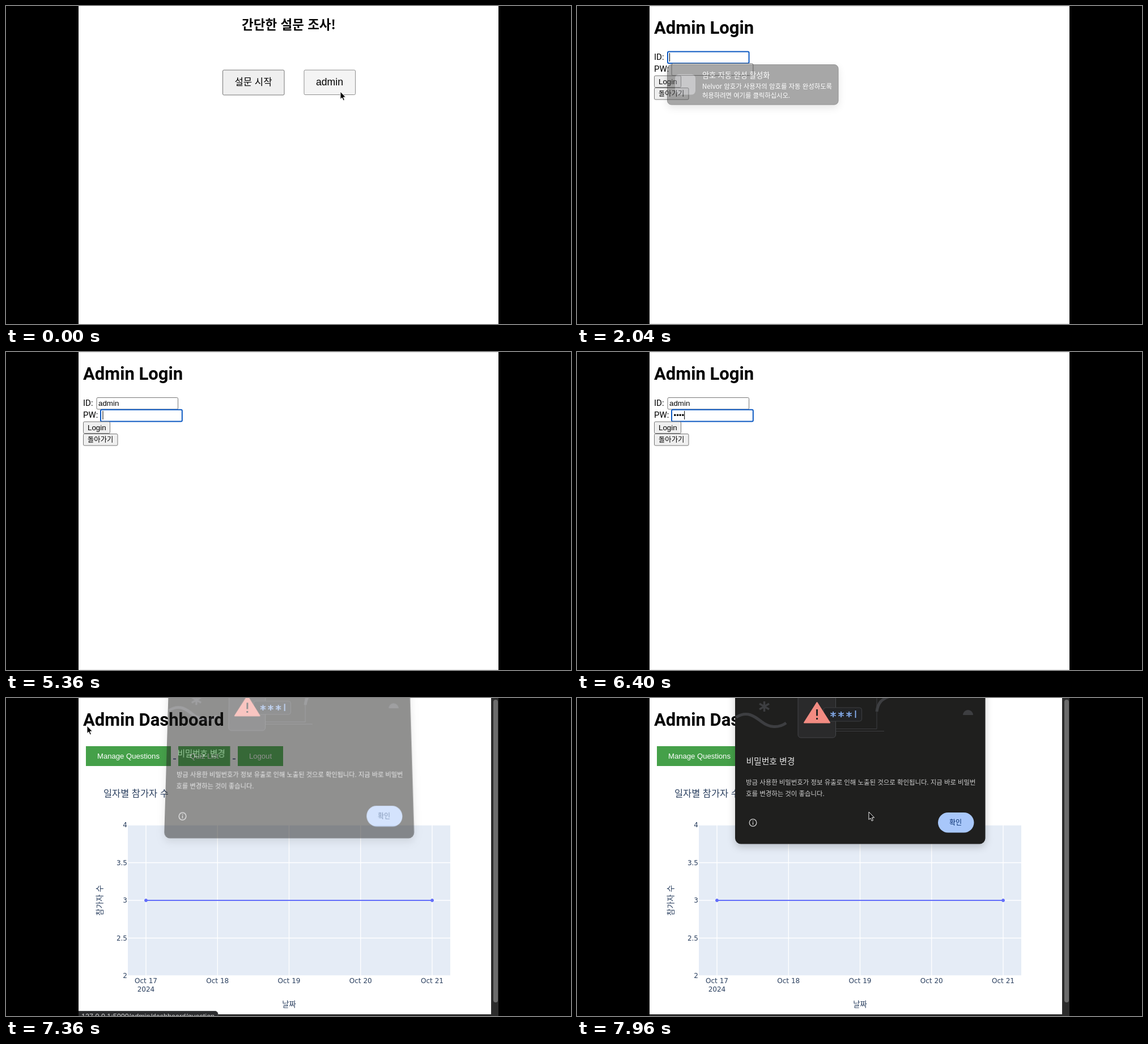
An HTML page for the animation above (8 s loop, 997x561 px).

```html
<!DOCTYPE html>
<html lang="ko">
<head>
<meta charset="utf-8">
<title>설문 조사</title>
<style>
  html, body { margin: 0; width: 100%; height: 100%; overflow: hidden; background: #000; }
  svg { position: absolute; left: 0; top: 0; width: 997px; height: 561px; }
  text { font: 13.33px "Liberation Sans", Arial, sans-serif; white-space: pre; }
  .ko { font-family: "Noto Sans CJK KR", "Noto Sans CJK", sans-serif; }
  .heading { font: bold 31px Roboto, sans-serif; }
  .label { font: 15px Roboto, sans-serif; }
  .chart text { fill: #2a3f5f; }
  .tick { font: 12px "DejaVu Sans", Verdana, sans-serif; }
  .mid { text-anchor: middle; }
  .end { text-anchor: end; }
  .button { fill: #efefef; stroke: #767676; }
  .field { fill: #fff; stroke: #767676; }
  .focus { stroke: #0c59c2; stroke-width: 2; }
  .green { fill: #4caf50; }
  .nav text { fill: #fff; font-size: 13.1px; text-anchor: middle; }
  .float { filter: drop-shadow(0 5px 7px rgba(0, 0, 0, .2)); }
  #dialog { overflow: visible; transform-origin: 499.5px 257px; }
</style>
</head>
<body>
<svg viewBox="0 0 997 561">
  <rect x="128" width="741" height="561" fill="#fff"/>

  <g id="home">
    <text class="ko mid" x="499" y="40.500" style="font-size:22.5px;font-weight:bold">간단한 설문 조사!</text>
    <rect class="button" x="382.500" y="113" width="108.500" height="44" rx="2"/>
    <text class="ko mid" x="436.500" y="140" style="font-size:16.7px">설문 시작</text>
    <rect class="button" x="526" y="113" width="90.500" height="43.500" rx="2" style="fill:#f4f4f4;stroke:#8f8f8f"/>
    <text class="mid" x="571" y="140" style="font-size:17.6px">admin</text>
  </g>

  <g id="login">
    <path d="M128 .5H869M128 560.5H869" stroke="#e4e4e4"/>
    <text class="heading" x="136" y="48.500">Admin Login</text>
    <text class="label" x="136" y="94.500">ID:</text>
    <text class="label" x="136" y="115.500">PW:</text>
    <rect id="idField" class="field" x="160" y="80.500" width="143.500" height="20.500" rx="2"/>
    <rect id="pwField" class="field" x="167" y="101.700" width="143.800" height="20.800" rx="2"/>
    <text id="idText" x="163" y="95"></text>
    <text id="pwText" x="170.500" y="116"></text>
    <rect id="caret" width="1" height="15"/>
    <rect class="button" x="136.500" y="123" width="47" height="20.500" rx="2"/>
    <text x="144" y="137.500">Login</text>
    <rect class="button" x="136.500" y="144.500" width="60.500" height="20.500" rx="2"/>
    <text class="ko" x="144" y="158.500" style="font-size:12.3px">돌아가기</text>

    <g id="keyPopup" class="float">
      <rect x="159.500" y="103.500" width="301.500" height="70.500" rx="7" fill="#515151" stroke="#2a2a2a"/>
      <rect x="173" y="120.500" width="36" height="36" rx="7" fill="#929397"/>
      <g fill="#fff">
        <text class="ko" x="221" y="126.500" style="font-size:13.1px">암호 자동 완성 활성화</text>
        <text class="ko" x="221" y="146" style="font-size:11.4px">Nelvor 암호가 사용자의 암호를 자동 완성하도록</text>
        <text class="ko" x="221" y="161.500" style="font-size:11.3px">허용하려면 여기를 클릭하십시오.</text>
      </g>
    </g>
    <g id="translate" class="float">
      <rect x="483" y="-30" width="252.500" height="75.500" rx="11" fill="#242424"/>
      <path d="M483 6.500H735" stroke="#454545"/>
      <text class="label" x="503" y="28" fill="#7a7a7a" style="font-size:11.3px">Pomivo Translate</text>
    </g>
  </g>

  <g id="dashboard">
    <text class="heading" x="136" y="48.500">Admin Dashboard</text>
    <path d="M295 107.500H300M400 107.500H405" stroke="#23306e" stroke-width="1.500"/>
    <g class="nav">
      <rect x="141" y="85" width="150" height="35" fill="#45a049"/>
      <rect class="green" x="304" y="85" width="91.500" height="35"/>
      <rect class="green" x="409" y="85" width="80" height="35"/>
      <text x="216" y="107">Manage Questions</text>
      <text x="350" y="107">Quiz List</text>
      <text x="449" y="107">Logout</text>
    </g>
    <g id="chart" class="chart">
      <text class="ko" x="172" y="174" style="font-size:16.4px">일자별 참가자 수</text>
      <rect x="215" y="224" width="569" height="266" fill="#e5ecf6"/>
      <g id="axes"></g>
      <text class="tick mid" x="247" y="518">2024</text>
      <g fill="#636efa" stroke="#636efa">
        <path d="M247 357H752" stroke-width="2"/>
        <circle cx="247" cy="357" r="2.500"/>
        <circle cx="752" cy="357" r="2.500"/>
      </g>
      <text class="ko mid" x="499.500" y="544.500" style="font-size:13.3px">날짜</text>
      <text class="ko mid" transform="translate(170 357) rotate(-90)" style="font-size:13.6px">참가자 수</text>
    </g>
    <path d="M856 0H869V561H128V558H856Z" fill="#2c2c2c"/>
    <rect x="860" y="3" width="8" height="534" rx="4" fill="#6c6c6c"/>
    <g id="status">
      <rect x="120" y="552.500" width="254" height="20" rx="5" fill="#2b2c2e" stroke="#47484a"/>
      <text x="133" y="566" fill="#d0d0d0" style="font-size:12.55px">127.0.0.1:5000/admin/dashboard/question</text>
    </g>
  </g>
</svg>

<svg id="dialog" class="float" viewBox="0 0 997 561">
  <rect x="279" y="-70" width="441.500" height="327.500" rx="10" fill="#1f1f1e"/>
  <g fill="none" stroke="#3d3e41">
    <path d="M281 34C300 22 313 32 326 42S355 54 369 44" stroke-width="5"/>
    <path d="M330.500 6V24M322 10L339 20M339 10L322 20" stroke-width="3.500"/>
    <path d="M529 24C531 8 538 2 550 -2" stroke-width="5"/>
    <path d="M456 54.500H529V-10M456 58.500H542"/>
    <rect x="390" y="-20" width="66.500" height="90" rx="5" fill="#2a2a2b" stroke="#444548"/>
    <rect x="435" y="17" width="67.500" height="24" rx="4" fill="#222325"/>
  </g>
  <path d="M681 30a9 9 0 0 1 18 0Z" fill="#3d3e41"/>
  <path d="M401 43.500L423.500 8L446 43.500Z" fill="#f28b82" stroke="#f28b82" stroke-width="2" stroke-linejoin="round"/>
  <path d="M423.500 20V31.500M423.500 35V38" stroke="#262626" stroke-width="3"/>
  <g stroke="#8ab4f8" stroke-width="1.800">
    <path id="stars"/>
    <path d="M491.500 22V35"/>
  </g>
  <text class="ko" x="298.500" y="116.500" fill="#e6e6e6" style="font-size:14.8px;font-weight:500">비밀번호 변경</text>
  <g fill="#cfcfcf">
    <text class="ko" x="298" y="152.500" style="font-size:11.42px">방금 사용한 비밀번호가 정보 유출로 인해 노출된 것으로 확인됩니다. 지금 바로 비밀번</text>
    <text class="ko" x="298" y="172.500" style="font-size:11.42px">호를 변경하는 것이 좋습니다.</text>
  </g>
  <g fill="none" stroke="#cfcfcf" stroke-width="1.300">
    <circle cx="310.500" cy="220" r="6.300"/>
    <path d="M310.500 219V223.500M310.500 216.200V217.700"/>
  </g>
  <rect x="637" y="202" width="63.500" height="35.500" rx="17.750" fill="#a8c7fa"/>
  <text class="ko mid" x="668" y="224" fill="#062e6f" style="font-size:12px;font-weight:500">확인</text>
</svg>

<svg viewBox="0 0 997 561">
  <path d="M0 0H128V561H0ZM869 0H997V561H869Z"/>
  <path id="cursor" d="M0 0V13.500L3 10.800L5.200 15.800L7.400 14.800L5.300 10H9.500Z" stroke="#fff"/>
</svg>

<script>
const LOOP = 8000, STEP = 40;
const el = Object.fromEntries([...document.querySelectorAll('[id]')].map(e => [e.id, e]));

const ramp = (t, from, to) => Math.min(1, Math.max(0, (t - from) / (to - from)));
const within = (t, from, to) => t >= from && t < to;
const show = (e, on) => { e.style.display = on ? '' : 'none'; };
const typed = (text, times, t) => text.slice(0, times.filter(time => t >= time).length);
const pulse = (t, [inStart, inEnd, outStart, outEnd]) => ramp(t, inStart, inEnd) - ramp(t, outStart, outEnd);

const cursorPath = [
  [0, 590, 151], [520, 590, 151], [800, 424, 149], [1320, 261, 90],
  [7120, 261, 90], [7360, 143, 49], [7680, 470, 175], [7840, 515, 201], [LOOP, 515, 201]
];
const idPopupTimes = [[680, 760, 2000, 2080], [2520, 2640, 2920, 3000]];
const pwPopupTimes = [5360, 5440, 5800, 5880];
const idKeys = [3000, 3440, 3880, 4320, 4560];
const pwKeys = [5840, 6120, 6280, 6400];
const caretOff = [[1720, 2040], [2560, 3000], [5040, 5360]];

function drawAxes() {
  let out = '';
  for (let i = 0; i < 5; i++) {
    const x = 247 + i * 126.25, y = 224 + i * 66.5;
    out += `<path d="M${x} 224V490M215 ${y}H784" stroke="#fff" stroke-width="1.3"/>
      <text class="tick mid" x="${x}" y="503">Oct ${17 + i}</text>
      <text class="tick end" x="214" y="${y + 4}">${4 - i / 2}</text>`;
  }
  el.axes.innerHTML = out;
  el.stars.setAttribute('d', [452, 466, 480].map(x =>
    `M${x} 24V34M${x - 4.5} 26.500L${x + 4.5} 31.500M${x + 4.5} 26.500L${x - 4.5} 31.500`).join(''));
}

function drawLogin(t) {
  const onPw = t >= 5360;
  el.idField.classList.toggle('focus', !onPw);
  el.pwField.classList.toggle('focus', onPw);
  el.idText.textContent = typed('admin', idKeys, t);
  el.pwText.textContent = typed('••••', pwKeys, t);

  const active = onPw ? el.pwText : el.idText;
  const width = active.textContent ? active.getComputedTextLength() : 0;
  el.caret.setAttribute('x', (onPw ? 170.5 : 163) + width);
  el.caret.setAttribute('y', onPw ? 104 : 83);
  show(el.caret, !caretOff.some(([from, to]) => within(t, from, to)));

  const opacity = onPw ? pulse(t, pwPopupTimes) : idPopupTimes.reduce((sum, times) => sum + pulse(t, times), 0);
  el.keyPopup.style.opacity = opacity;
  el.keyPopup.setAttribute('transform', onPw ? 'translate(8 21)' : '');
  show(el.translate, within(t, 640, 1360));
}

function drawDashboard(t) {
  show(el.chart, t >= 6960);
  show(el.status, t >= 7160);
  el.status.style.opacity = 1 - ramp(t, 7680, 7880);

  // The dialog swings in from the top while fading.
  const p = ramp(t, 7240, 7480), tilt = 2 * (1 - p);
  el.dialog.style.opacity = p;
  el.dialog.style.transform = tilt
    ? `translateY(${-10 * tilt}px) perspective(1000px) rotateX(${7.7 * tilt}deg) scaleY(${1 + .05 * tilt})`
    : 'none';
}

function drawCursor(t) {
  const i = cursorPath.findIndex(point => t < point[0]);
  const [t0, x0, y0] = cursorPath[i - 1], [t1, x1, y1] = cursorPath[i];
  const p = ramp(t, t0, t1);
  el.cursor.setAttribute('transform', `translate(${x0 + (x1 - x0) * p} ${y0 + (y1 - y0) * p})`);
  show(el.cursor, !within(t, 1520, 7120));
}

function render(now) {
  const t = Math.floor(now % LOOP / STEP) * STEP;
  const scene = t < 600 ? 'home' : t < 6880 ? 'login' : 'dashboard';
  for (const name of ['home', 'login', 'dashboard']) show(el[name], name === scene);
  show(el.dialog, t > 7240);
  if (scene === 'login') drawLogin(t);
  if (scene === 'dashboard') drawDashboard(t);
  drawCursor(t);
}

drawAxes();
const start = performance.now();
function tick() {
  render(performance.now() - start);
  requestAnimationFrame(tick);
}
tick();
</script>
</body>
</html>
```
